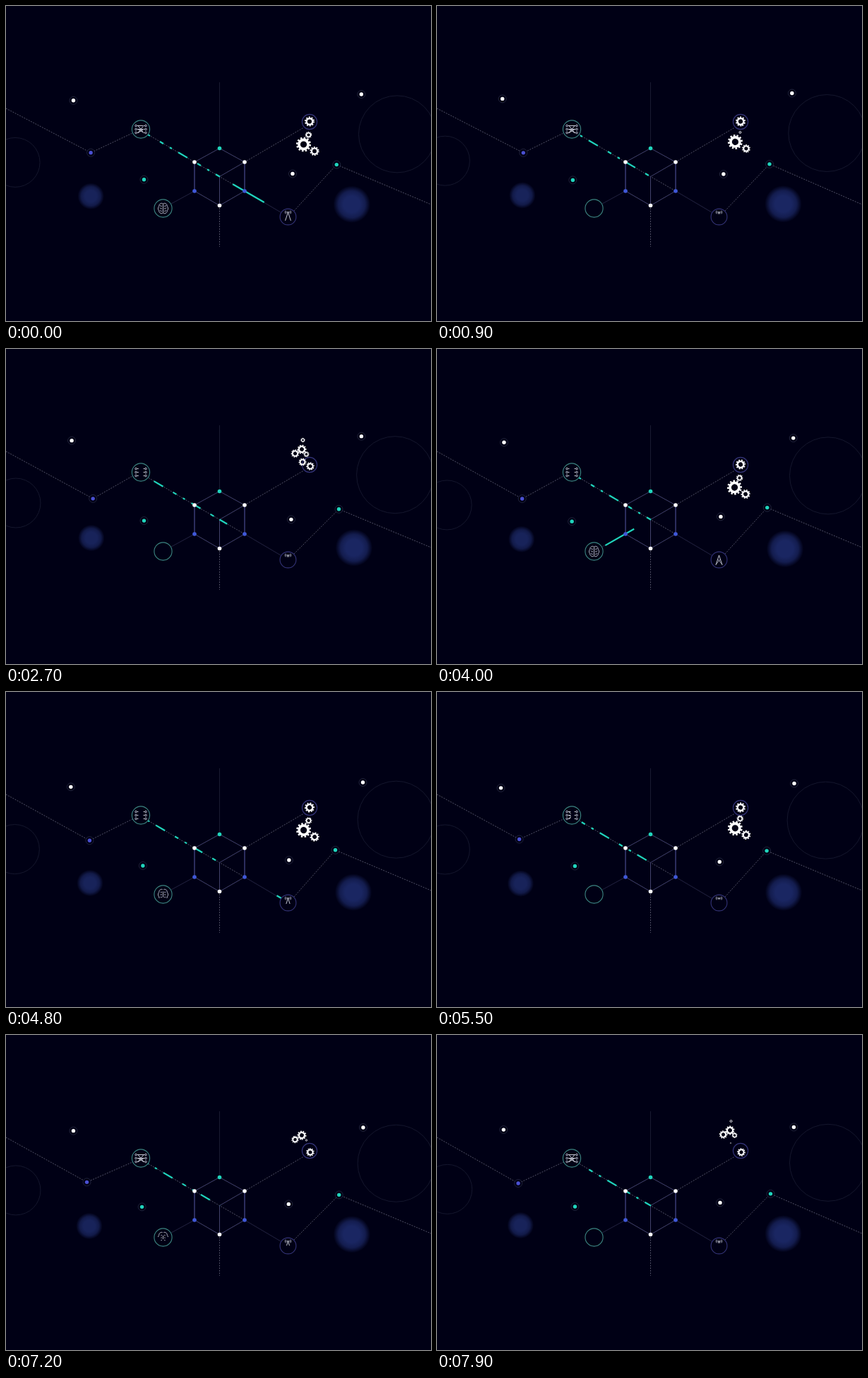
An HTML page with a canvas that plays this animation: 602x446 px, repeating every 8 s.

```html
<!DOCTYPE html>
<html lang="en">
<head>
<meta charset="utf-8">
<title>Connected network</title>
<style>
  html, body { margin: 0; width: 100%; height: 100%; overflow: hidden; background: #000015; }
  canvas { display: block; }
</style>
</head>
<body>
<canvas id="stage" width="602" height="446"></canvas>
<script>
const ctx = document.getElementById('stage').getContext('2d');
const LOOP = 8000, STEP = 100, TAU = Math.PI * 2;
const BG = '#000015', WHITE = '#fff', TEAL = '#20d5bd', BLUE = '#4058d8', INDIGO = '#4a50d2';
const DOTTED = 'rgba(190,190,210,.46)', FAINT = 'rgba(130,130,190,.26)';
const EDGE = '#42426c', SIDE = '#363b7a', ICON = '#dcdfe8';
const CENTER = [302.5, 241.5];
const HEX = [[302.5, 201.5], [338, 221], [338, 262], [302.5, 282.5], [267, 262], [267, 221]];
const HEX_COLORS = [TEAL, WHITE, BLUE, WHITE, BLUE, WHITE];

let now = 0;

const clamp = v => Math.max(0, Math.min(1, v));
const smooth = v => { v = clamp(v); return v * v * (3 - 2 * v); };
const easeOut = v => 1 - (1 - clamp(v)) ** 2;
const mix = (a, b, u) => a + (b - a) * u;
const mixPoint = (a, b, u) => [mix(a[0], b[0], u), mix(a[1], b[1], u)];
const modulo = (v, n) => ((v % n) + n) % n;

// Slow sway around a middle value; period and peak are in seconds.
const sway = (middle, reach, period, peak) =>
  middle + reach * Math.cos(TAU * (now / 1000 - peak) / period);

function line(points, color, width = 1, dash = []) {
  ctx.setLineDash(dash);
  ctx.strokeStyle = color;
  ctx.lineWidth = width;
  ctx.beginPath();
  points.forEach(p => ctx.lineTo(...p));
  ctx.stroke();
  ctx.setLineDash([]);
}
const dotted = (...points) => line(points, DOTTED, 1, [1.8, 1.8]);

function ring([x, y], r, color, width = 1, dash = [], from = 0, to = TAU) {
  ctx.setLineDash(dash);
  ctx.strokeStyle = color;
  ctx.lineWidth = width;
  ctx.beginPath();
  ctx.arc(x, y, r, from, to);
  ctx.stroke();
  ctx.setLineDash([]);
}
function disc([x, y], r, color) {
  ctx.fillStyle = color;
  ctx.beginPath();
  ctx.arc(x, y, r, 0, TAU);
  ctx.fill();
}
function star(p, color) {
  disc(p, 5.5, BG);
  ring(p, 5.5, 'rgba(150,160,200,.2)');
  disc(p, 2.7, color);
}
function blob(x, y, r, rgb) {
  const outer = r * 1.25, glow = ctx.createRadialGradient(x, y, r * .55, x, y, outer);
  glow.addColorStop(0, `rgb(${rgb})`);
  glow.addColorStop(.5, `rgba(${rgb},.75)`);
  glow.addColorStop(1, `rgba(${rgb},0)`);
  disc([x, y], outer, glow);
}

// Dashes stream from the upper left icon into the cube.
function drawStream() {
  const period = 53, dashes = [[0, 13], [-26, 5], [-12, 3]];
  const yAt = x => CENTER[1] + (x - CENTER[0]) * .585;
  for (let k = -3; k < 3; k++) {
    const head = 244 + (now * period / 2000) % period + k * period;
    for (const [offset, length] of dashes) {
      const a = Math.max(201, head + offset), b = Math.min(303, head + offset + length);
      if (b > a) line([[a, yAt(a)], [b, yAt(b)]], TEAL, 2.2);
    }
  }
}

// A line that shoots from an icon to the cube, its tail following after a lag.
function pulse(from, first, every, lag) {
  const age = modulo(now - first, every);
  const head = easeOut(age / 400), tail = easeOut((age - lag) / 400);
  if (head > tail) line([mixPoint(from, CENTER, tail), mixPoint(from, CENTER, head)], TEAL, 2.2);
}

// How much of an icon is drawn: it swells and fades with a regular beat.
const drawn = (period, peak, base, reach) => clamp(sway(base, reach, period, peak));

function badge(p, r, color) {
  disc(p, r, BG);
  ring(p, r, color, 1.1);
}

function chainIcon(x, y) {
  const grown = drawn(6, 1, .3, 1.2);
  const rows = [y - 5, y, y + 5];
  rows.forEach((row, i) => {
    for (const side of [-1, 1]) {
      ring([x + side * 7, row], 1.3, ICON, .8);
      line([[x + side * 5.7, row], [x + side * 3.5, row]], ICON, .8);
    }
    if (grown > 0) for (const target of [(3 - i) % 3, 2 - i]) {
      const start = [x - 4, row];
      line([start, mixPoint(start, [x + 4, rows[target]], grown)], ICON, .9);
    }
  });
}

function brainIcon(x, y) {
  const grown = drawn(2.33, 1.9, .55, 1.2);
  if (grown <= 0) return;
  ctx.save();
  ctx.translate(x, y);
  line([[0, -7 * grown], [0, 7 * grown]], ICON, .8);
  for (const side of [-1, 1]) {
    ctx.save();
    ctx.scale(side, 1);
    ctx.setLineDash([28 * grown, 40]);
    ctx.beginPath();
    ctx.moveTo(.8, -7);
    ctx.bezierCurveTo(4, -8, 6, -5, 5.8, -3);
    ctx.bezierCurveTo(7.6, -1, 7.3, 2, 5.8, 3.4);
    ctx.bezierCurveTo(6, 6, 3, 8, .8, 7);
    ctx.stroke();
    ctx.setLineDash([5 * grown, 20]);
    for (const fold of [-3.5, 0, 3.5]) {
      ctx.beginPath();
      ctx.moveTo(1.5, fold);
      ctx.quadraticCurveTo(3, fold + 2, 4.5, fold - 1);
      ctx.stroke();
    }
    ctx.restore();
  }
  ctx.restore();
}

function towerIcon(x, y) {
  const grown = drawn(2.33, 1.8, .6, .6), top = [x, y - 6.5];
  if (grown < .9) {
    disc(top, .9, ICON);
    for (const r of [2.4, 4.2]) for (const facing of [0, Math.PI])
      ring(top, r, ICON, .7, [], facing - .6, facing + .6);
  }
  const legs = clamp(grown / .8);
  for (const side of [-1, 1]) {
    line([top, mixPoint(top, [x + side * 4.6, y + 7.5], legs)], ICON, .9);
    if (grown > .8) line([[x + side * 1.6, y - .5], [x - side * 4, y + 6]], ICON, .7);
  }
}

function gear([x, y], r, angle) {
  if (r < .4) return;
  ctx.save();
  ctx.translate(x, y);
  ctx.rotate(angle);
  const teeth = r > 8 ? 12 : 10, pitch = TAU * r * .88 / teeth;
  ring([0, 0], r * .62, WHITE, r * .36);
  ring([0, 0], r * .88, WHITE, r * .24, [pitch * .5, pitch * .5]);
  ctx.restore();
}

// Gears [x, y, radius] pop in and out one after another; all but the first,
// which stays in its badge, float off once the scene has settled.
const GEAR_CYCLE = 4700, STAGGER = 70, POP = 200;
const gearScenes = [
  { begin: 3550, end: 5900, settled: 4700, dx: .001, dy: -.004,
    gears: [[430, 163.5, 7], [421.5, 196, 10.5], [437, 205.5, 6.6], [428.5, 182.5, 4.8]] },
  { begin: 1200, end: 2200, settled: 2200, dx: 0, dy: 0,
    gears: [[430, 169.5, 4.5], [425, 164, 2.5], [435.5, 173, 2.5], [430.5, 162, 2.5], [433, 157, 2.5]] },
  { begin: 2200, end: 3600, settled: 2700, dx: -.008, dy: -.014,
    gears: [[431, 166, 5.8], [419, 142, 6.5], [409.5, 148, 5.8], [425.5, 149, 4], [420.5, 129, 3.2], [420, 160, 6.5]] }
];
function drawGears() {
  for (const { begin, end, settled, dx, dy, gears } of gearScenes) {
    const phase = begin + modulo(now - begin, GEAR_CYCLE);
    if (phase > end) continue;
    const age = Math.max(0, phase - settled);
    gears.forEach(([x, y, r], i) => {
      const wait = i * STAGGER, float = i ? age : 0;
      const scale = smooth((phase - begin - wait) / POP) * smooth((end - wait - phase) / POP);
      gear([x + dx * float, y + dy * float], r * scale, now * .0015 * (i % 2 ? -1 : 1));
    });
  }
}

function drawNetwork() {
  const left = [sway(119, 4.5, 10, 2.1), sway(210, 2.5, 6, 3.4)];
  const right = [sway(469.5, 3, 6, 1.9), sway(225.3, 1.5, 4, 6.7)];
  dotted([0, 145], left, [179, 180]);
  dotted([408, 290], right, [602, 281]);
  dotted([202, 182.5], HEX[5], CENTER, HEX[2]);
  dotted(HEX[1], [421, 172.5]);
  dotted(HEX[3], [302.5, 341]);
  line([HEX[2], [389, 292]], FAINT);
  line([HEX[4], [234, 280]], FAINT);
  line([[302.5, 108], HEX[0]], 'rgba(160,165,200,.16)');
  line([...HEX, HEX[0]], EDGE);
  line([HEX[1], CENTER, HEX[3]], EDGE);
  line([HEX[1], HEX[2]], SIDE);
  line([HEX[4], HEX[5]], SIDE);
  star(left, INDIGO);
  star(right, TEAL);
}

function drawBackdrop() {
  ctx.fillStyle = BG;
  ctx.fillRect(0, 0, 602, 446);
  ring([sway(13, 1.7, 4.5, 3.4), sway(220.3, 2.7, 6.6, 5.4)], 35, '#15172d');
  ring([sway(552, 2, 4, 4), sway(180.2, 2, 7.5, 6.4)], 54.5, '#15172d');
  blob(sway(119.5, 1.6, 10, 1.8), sway(269.3, 2, 8, 6), 15, '24,35,90');
  blob(sway(491.5, 1.7, 7, 3.4), sway(282, 1.7, 8.5, 5.3), 21, '26,38,98');
}

function drawStars() {
  star([sway(93, 2.5, 3.7, 3.6), sway(133, 3.5, 8, 6.3)], WHITE);
  star([sway(504.5, 1.7, 10, 6.3), sway(127, 4, 10.5, 7)], WHITE);
  star([sway(403, 3, 12, .3), sway(239.5, 2.3, 3.9, 2.3)], WHITE);
  star([sway(193.3, 2.2, 2.65, 2.7), sway(244.7, 1.8, 4.7, .7)], TEAL);
}

function drawIcons() {
  badge([191, 174.5], 12.6, '#3c8582');
  badge([222.5, 286.5], 12.6, '#3c8582');
  badge([430, 164], 10.6, '#343478');
  badge([399.5, 298.5], 11.4, '#343478');
  chainIcon(191, 174.5);
  brainIcon(222.5, 286.5);
  towerIcon(399.5, 298.5);
  drawGears();
}

function frame() {
  now = Math.floor(performance.now() % LOOP / STEP) * STEP;
  drawBackdrop();
  drawNetwork();
  drawStars();
  drawStream();
  pulse([235, 280], 1535, 2300, 155);
  pulse([390, 292], 2285, 2500, 155);
  pulse([421, 172.5], 1365, 4785, 230);
  HEX.forEach((p, i) => disc(p, 2.8, HEX_COLORS[i]));
  drawIcons();
  requestAnimationFrame(frame);
}
frame();
</script>
</body>
</html>
```
